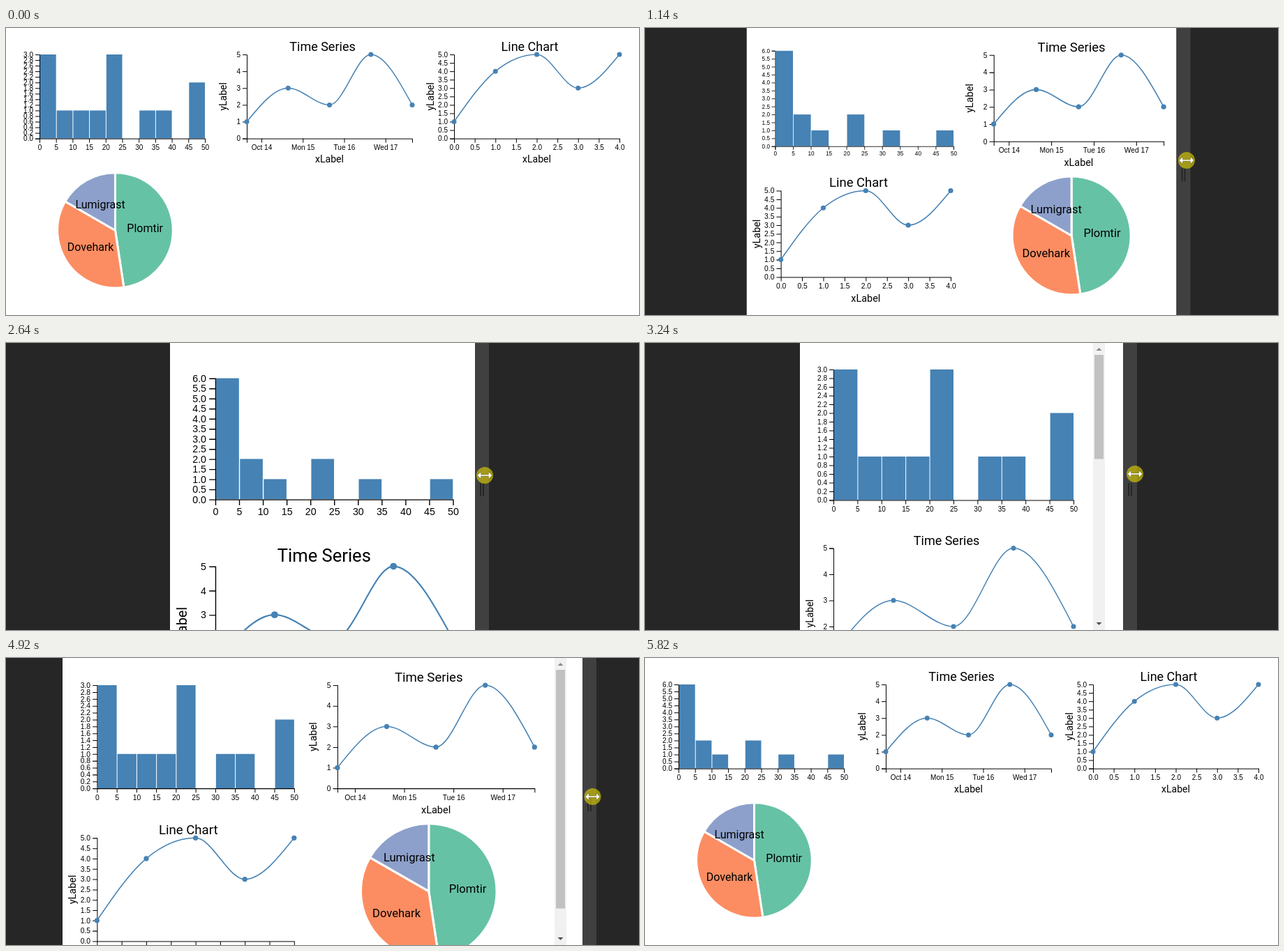
Animation, 907 px wide and 412 px high, one loop 5.88 s. Source, as an HTML page with a canvas:

```html
<!DOCTYPE html>
<html lang="en">
<head>
<meta charset="utf-8">
<title>Responsive charts</title>
<style>
html, body { margin: 0; height: 100%; overflow: hidden; background: #fff; }
canvas { display: block; }
</style>
</head>
<body>
<canvas id="stage" width="907" height="412"></canvas>
<script>
const W = 907, H = 412, LOOP = 5880, STEP = 60;
const ctx = document.getElementById('stage').getContext('2d');
const BLUE = 'steelblue', TICK = '10px "Liberation Sans", sans-serif';

// [time, page inset, pointer offset from the page edge, pointer y]
const keys = [
  [0, 0, 14, 190], [180, 0, 14, 190], [300, 8, 14, 190], [420, 28, 14, 190], [540, 67, 14, 190],
  [600, 109, 13, 190], [660, 109, 13, 190], [780, 115, 14, 190], [1140, 145.5, 14.5, 190],
  [2160, 145.5, 14.5, 190], [2220, 160.5, 5, 190], [2280, 170, 5, 190], [2640, 235, 14, 190],
  [3180, 235, 15, 189], [3240, 222, 17, 188], [3720, 104, 15, 198], [4800, 104, 15, 198],
  [5040, 58, 14, 200], [5220, 18, 13, 201], [5280, 18, 13, 201], [5400, 10, 13, 201],
  [5640, 0, 14, 201], [LOOP, 0, 14, 201]
];
const settles = [0, 1320, 2700, 3780, 5820];              // every chart is rebuilt
const flips = [0, 600, 1320, 2040, 2820, 3540, 4380, 5100]; // histogram data swaps
const presses = [[240, 1140], [1740, 3720], [4860, 5640]];

const counts = [[3, 1, 1, 1, 3, 0, 1, 1, 0, 2], [6, 2, 1, 0, 2, 0, 1, 0, 0, 1]];
const slices = [['Plomtir', 20, '#66c2a5'], ['Dovehark', 15, '#fc8d62'], ['Lumigrast', 7, '#8da0cb']];

const last = (times, t) => times.filter(v => v <= t).pop();
const range = (end, step) => Array.from({ length: Math.round(end / step) + 1 }, (_, i) => i * step);

function pose(t) {
  const i = Math.max(1, keys.findIndex(k => k[0] >= t));
  const a = keys[i - 1], b = keys[i], p = Math.max(0, (t - a[0]) / (b[0] - a[0]));
  return a.map((v, j) => v + (b[j] - v) * p);
}

// The framed document follows the page edge one step late.
function layout(t) {
  const frame = W - 2 * pose(Math.max(0, t - STEP))[1];
  const cols = frame < 560 ? 1 : frame < 800 ? 2 : 3;
  const fit = bar => {
    const cell = (frame - bar - 16) / cols, pitch = cell / 1.6 + 4;
    return { frame, cols, bar, cell, pitch, height: 16 + Math.ceil(4 / cols) * pitch };
  };
  const plain = fit(0);
  return plain.height > H ? fit(17) : plain;
}

function rect(color, x, y, w, h) {
  ctx.fillStyle = color;
  ctx.fillRect(x, y, w, h);
}

function text(str, x, y, font, align = 'center') {
  ctx.fillStyle = '#000';
  ctx.font = font;
  ctx.textAlign = align;
  ctx.fillText(str, x, y);
}

const label = (str, x, y, size) => text(str, x, y, size + 'px Roboto, sans-serif');

function polygon(points, fill) {
  ctx.beginPath();
  points.forEach(p => ctx.lineTo(...p));
  ctx.closePath();
  ctx.fillStyle = fill;
  ctx.fill();
}

// Ticks are [fraction, label] pairs.
function axes(w, h, xTicks, yTicks) {
  ctx.beginPath();
  ctx.moveTo(-6, .5); ctx.lineTo(.5, .5); ctx.lineTo(.5, h + .5); ctx.lineTo(-6, h + .5);
  ctx.moveTo(.5, h + 6); ctx.lineTo(.5, h + .5); ctx.lineTo(w + .5, h + .5); ctx.lineTo(w + .5, h + 6);
  for (const [f, s] of xTicks) {
    ctx.moveTo(f * w + .5, h); ctx.lineTo(f * w + .5, h + 6);
    text(s, f * w + .5, h + 16.1, TICK);
  }
  for (const [f, s] of yTicks) {
    const y = h * (1 - f) + .5;
    ctx.moveTo(0, y); ctx.lineTo(-6, y);
    text(s, -9, y + 3.2, TICK, 'right');
  }
  ctx.strokeStyle = '#000';
  ctx.lineWidth = 1;
  ctx.stroke();
}

const ticks = (end, step, digits) => range(end, step).map(v => [v / end, v.toFixed(digits)]);

function histogram(w, h, data) {
  const max = Math.max(...data), bw = w / data.length;
  data.forEach((n, i) => rect(BLUE, i * bw + 1, h * (1 - n / max), bw - 1, h * n / max));
  axes(w, h, ticks(50, 5, 0), ticks(max, max > 3 ? .5 : .2, 1));
}

// Monotone cubic through evenly spaced points.
function curve(pts) {
  const n = pts.length - 1, dx = pts[1][0] - pts[0][0];
  const s = range(n - 1, 1).map(i => (pts[i + 1][1] - pts[i][1]) / dx);
  const m = pts.map((_, i) => i && i < n
    ? (Math.sign(s[i - 1]) + Math.sign(s[i])) *
      Math.min(Math.abs(s[i - 1]), Math.abs(s[i]), Math.abs(s[i - 1] + s[i]) / 4) : 0);
  m[0] = (3 * s[0] - m[1]) / 2;
  m[n] = (3 * s[n - 1] - m[n - 1]) / 2;
  ctx.beginPath();
  ctx.moveTo(...pts[0]);
  for (let i = 0; i < n; i++) {
    const [x, y] = pts[i], [X, Y] = pts[i + 1], d = dx / 3;
    ctx.bezierCurveTo(x + d, y + d * m[i], X - d, Y - d * m[i + 1], X, Y);
  }
  ctx.strokeStyle = BLUE;
  ctx.lineWidth = 1.5;
  ctx.stroke();
}

function lineChart(w, h, title, data, xTicks, yTicks) {
  axes(w, h, xTicks, yTicks);
  const pts = data.map((v, i) => [w * i / 4, h * (1 - v / 5)]);
  curve(pts);
  for (const [x, y] of pts) {
    ctx.beginPath();
    ctx.arc(x, y, 3.5, 0, 7);
    ctx.fillStyle = BLUE;
    ctx.fill();
  }
  label(title, w / 2 - 10, -5, 18);
  label('xLabel', w / 2, h + 34.5, 14);
  ctx.rotate(-Math.PI / 2);
  label('yLabel', -h / 2, -29, 14);
}

function pie(w, h) {
  const r = h / 2 - 10, total = 42, labels = [];
  let from = -Math.PI / 2;
  ctx.translate(w / 2, h / 2);
  for (const [name, value, color] of slices) {
    const to = from + value / total * 2 * Math.PI, mid = (from + to) / 2;
    ctx.beginPath();
    ctx.moveTo(0, 0);
    ctx.arc(0, 0, r, from, to);
    ctx.closePath();
    ctx.fillStyle = color;
    ctx.fill();
    ctx.strokeStyle = '#fff';
    ctx.lineWidth = 3;
    ctx.stroke();
    labels.push([name, Math.cos(mid) * (r - 40), Math.sin(mid) * (r - 40) + 5.6, 16]);
    from = to;
  }
  labels.forEach(l => label(...l));
}

const days = ['Oct 14', 'Mon 15', 'Tue 16', 'Wed 17'].map((s, i) => [.0886 + i / 4, s]);
const charts = [
  (w, h, data) => histogram(w, h, data),
  (w, h) => lineChart(w, h, 'Time Series', [1, 3, 2, 5, 2], days, ticks(5, 1, 0)),
  (w, h) => lineChart(w, h, 'Line Chart', [1, 4, 5, 3, 5], ticks(4, .5, 1), ticks(5, .5, 1)),
  pie
];

function scrollbar(x, height) {
  rect('#f1f1f1', x, 0, 17, H);
  rect('#c1c1c1', x + 2, 17, 13, (H - 34) * H / height);
  polygon([[x + 4.5, 11], [x + 8.5, 7], [x + 12.5, 11]], '#8b8b8b');
  polygon([[x + 4.5, 401], [x + 8.5, 405], [x + 12.5, 401]], '#505050');
}

function pointer(x, y, pressed) {
  if (pressed) {
    ctx.beginPath();
    ctx.arc(x, y, 12, 0, 7);
    ctx.fillStyle = 'rgba(230,215,0,.6)';
    ctx.fill();
  }
  const half = [[-10.5, 0], [-5.5, -5], [-5.5, -1], [5.5, -1], [5.5, -5]];
  const shape = [...half, ...half.map(([a, b]) => [-a, -b])].map(([a, b]) => [x + a, y + b]);
  polygon(shape, '#fff');
  ctx.strokeStyle = pressed ? 'rgba(60,55,0,.4)' : '#000';
  ctx.lineWidth = .8;
  ctx.stroke();
}

function draw(t) {
  const [, left, offset, py] = pose(t), right = W - left, px = right + offset;
  const { frame, cols, bar, cell, pitch, height } = layout(t);
  const settled = last(settles, t), flipped = last(flips, t);
  const mainWidth = layout(settled).cell;
  const histWidth = layout(Math.max(settled, flipped)).cell;
  const data = counts[flips.indexOf(flipped) % 2];

  rect('#262626', 0, 0, W, H);
  const grip = Math.min(right, px - 14);
  rect('#404040', grip, 0, 20, H);
  rect('#262626', grip + 7, 201, 2, 19);
  rect('#262626', grip + 11, 201, 2, 19);

  ctx.save();
  ctx.beginPath();
  ctx.rect(left, 0, right - left, H);
  ctx.clip();
  rect('#fff', left, 0, right - left, H);
  charts.forEach((chart, i) => {
    const w = i ? mainWidth : histWidth, h = w / 1.6, s = cell / w;
    ctx.save();
    ctx.translate(left + 8 + i % cols * cell, 8 + Math.floor(i / cols) * pitch);
    ctx.scale(s, s);
    if (chart === pie) chart(w, h);
    else {
      ctx.translate(40, 30);
      chart(w - 60, h - 65, data);
    }
    ctx.restore();
  });
  if (bar) scrollbar(left + frame - bar, height);
  ctx.restore();

  if (left > 0) pointer(px, py, presses.some(([a, b]) => t >= a && t <= b));
}

function tick(now) {
  draw(Math.floor(now % LOOP / STEP) * STEP);
  requestAnimationFrame(tick);
}
requestAnimationFrame(tick);
</script>
</body>
</html>
```
